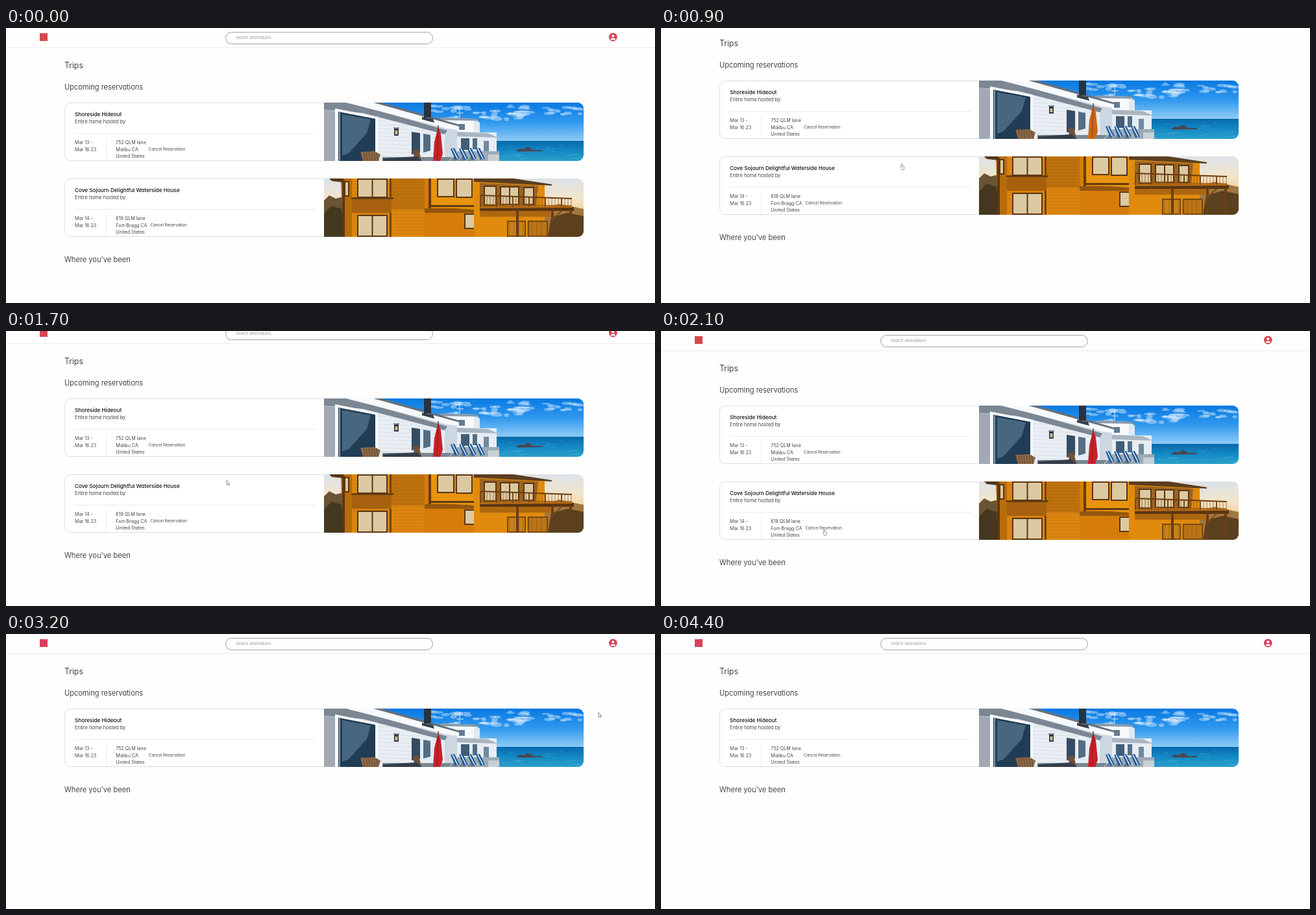
An HTML page with a canvas for the animation above (5000 ms loop, 1000 px wide and 424 px high).

```html
<!DOCTYPE html>
<html lang="en">
<head>
<meta charset="utf-8">
<title>Trips</title>
<style>
  html, body { margin: 0; width: 100%; height: 100%; overflow: hidden; background: #fefefe; }
  canvas, svg { position: absolute; left: 0; top: 0; width: 1000px; height: 424px; }
  svg { overflow: hidden; }
  text { font-family: Inter, "Open Sans", sans-serif; font-weight: 300; font-feature-settings: "cv11"; fill: #111; }
  .h1 { font-size: 12.6px; }
  .h2 { font-size: 11.2px; }
  .title { font-size: 8.2px; font-weight: 500; }
  .sub { font-size: 7.5px; }
  .info { font-size: 7.15px; }
  .small { font-size: 6.2px; }
  .hint { font-size: 5.95px; fill: #777; }
</style>
</head>
<body>
<canvas id="stage" width="1000" height="424"></canvas>
<svg viewBox="0 0 1000 424">
  <g id="page">
    <text class="hint" x="354" y="17.3">Search destinations</text>
    <text class="h1" x="90" y="62">Trips</text>
    <text class="h2" x="90" y="95">Upcoming reservations</text>
    <g id="cards"></g>
    <text class="h2" id="past" x="90">Where you've been</text>
  </g>
  <g id="pointer" fill="#fff" stroke="#666" stroke-width=".7" stroke-linejoin="round">
    <path id="arrow" d="M0 0V7.2L1.6 5.8L2.7 8.2L3.7 7.7L2.7 5.4H4.7Z"/>
    <path id="hand" d="M1.5 0Q2.4 0 2.4 1V3.6L5.4 4.3V6.6L4.6 9H1.8L-.6 5.6L.6 5V1Q.6 0 1.5 0Z"/>
  </g>
</svg>
<script>
const LOOP = 5000, REMOVED = 2700, CARD_Y = 115, CARD_GAP = 117;
const ctx = document.getElementById('stage').getContext('2d');
const el = id => document.getElementById(id);

// start time, scroll offset, pointer x, pointer y, pointer kind
const steps = [
  [0, 0, 0, 0, ''],
  [300, 0, 340, 340, 'arrow'],
  [500, 0, 349, 218, 'arrow'],
  [600, 7, 358, 215, 'arrow'],
  [700, 19, 366, 212, 'arrow'],
  [800, 28, 369, 210, 'arrow'],
  [900, 34, 369.5, 209.5, 'hand'],
  [1000, 39, 368, 209, 'arrow'],
  [1100, 39, 366, 209, 'arrow'],
  [1500, 34, 364, 210, 'arrow'],
  [1600, 22, 355, 217, 'arrow'],
  [1700, 11, 340, 230, 'arrow'],
  [1800, 4, 318, 250, 'arrow'],
  [1900, 0, 292, 274, 'arrow'],
  [2000, 0, 265, 297, 'arrow'],
  [2100, 0, 250, 306, 'hand'],
  [REMOVED, 0, 250, 306, 'arrow'],
  [3100, 0, 640, 205, 'arrow'],
  [3200, 0, 913, 121, 'arrow'],
  [3600, 0, 910, 200, 'arrow'],
  [3900, 0, 890, 300, 'arrow'],
  [4000, 0, 875, 394, 'arrow'],
  [4200, 0, 870, 406, 'arrow'],
  [4300, 0, 868, 418, 'arrow'],
  [4400, 0, 0, 0, '']
];

const trips = [
  { title: 'Shoreside Hideout', from: 'Mar 13 -', street: '752 QLM lane', city: 'Malibu CA', cancelX: 220, photo: beach },
  { title: 'Cove Sojourn Delightful Waterside House', from: 'Mar 14 -', street: '618 QLM lane', city: 'Fort-Bragg CA', cancelX: 222.5, photo: lodge }
];

function addText(parent, cls, x, y, value) {
  const node = document.createElementNS('http://www.w3.org/2000/svg', 'text');
  node.setAttribute('class', cls);
  node.setAttribute('x', x);
  node.setAttribute('y', y);
  node.textContent = value;
  parent.append(node);
}

trips.forEach((trip, i) => {
  const g = document.createElementNS('http://www.w3.org/2000/svg', 'g');
  g.setAttribute('transform', `translate(0 ${i * CARD_GAP})`);
  addText(g, 'title', 106, 136.2, trip.title);
  addText(g, 'sub', 106, 147.4, 'Entire home hosted by');
  addText(g, 'info', 106, 179.3, trip.from);
  addText(g, 'info', 106, 189.8, 'Mar 16 23');
  addText(g, 'info', 169.3, 179.3, trip.street);
  addText(g, 'info', 169.3, 189.8, trip.city);
  addText(g, 'info', 169.3, 200.2, 'United States');
  addText(g, 'small', trip.cancelX, 189.2, 'Cancel Reservation');
  el('cards').append(g);
});

function box(color, x, y, w, h) {
  ctx.fillStyle = color;
  ctx.fillRect(x, y, w, h);
}

function poly(color, ...pts) {
  ctx.fillStyle = color;
  ctx.beginPath();
  for (let i = 0; i < pts.length; i += 2) ctx.lineTo(pts[i], pts[i + 1]);
  ctx.fill();
}

function oval(color, x, y, rx, ry) {
  ctx.fillStyle = color;
  ctx.beginPath();
  ctx.ellipse(x, y, rx, ry, 0, 0, 7);
  ctx.fill();
}

function line(color, width, x1, y1, x2, y2) {
  ctx.strokeStyle = color;
  ctx.lineWidth = width;
  ctx.beginPath();
  ctx.moveTo(x1, y1);
  ctx.lineTo(x2, y2);
  ctx.stroke();
}

function fade(y1, y2, ...colors) {
  const g = ctx.createLinearGradient(0, y1, 0, y2);
  colors.forEach((c, i) => g.addColorStop(i / (colors.length - 1), c));
  return g;
}

function randomizer(seed) {
  return () => (seed = seed * 16807 % 2147483647) / 2147483647;
}

function pane(x, y, w, h, cols, frame = '#5b3512', glass = '#dcc9a2') {
  box(frame, x, y, w, h);
  const step = (w - 2) / cols;
  for (let i = 0; i < cols; i++) box(glass, x + 2 + i * step, y + 2, step - 2, h - 4);
}

function beach(umbrella) {
  box(fade(0, 60, '#0879e2', '#2f98ee', '#92cdf5'), 0, 0, 400, 60);
  const rnd = randomizer(71);
  for (let i = 0; i < 46; i++) {
    const x = 165 + rnd() * 150, y = 4 + rnd() * 24;
    oval('rgba(235,246,255,.42)', x, y, 3 + rnd() * 9, 1 + rnd() * 2.2);
  }
  for (let i = 0; i < 14; i++) {
    oval('rgba(235,246,255,.4)', 330 + rnd() * 70, 7 + rnd() * 12, 3 + rnd() * 7, 1 + rnd() * 1.8);
  }
  box(fade(59, 90, '#0868ad', '#1389c4', '#2a9fca'), 240, 59, 160, 31);
  for (let i = 0; i < 16; i++) box('rgba(130,210,235,.35)', 270 + rnd() * 120, 64 + rnd() * 24, 5 + rnd() * 12, .7);
  poly('#4b4650', 296, 74, 302, 71, 308, 72, 313, 68.5, 318, 70, 322, 73, 334, 73, 338, 75, 298, 75.5);

  // Far house
  poly('#dfe9f2', 176, 28, 182, 23, 232, 25, 240, 31, 240, 50, 176, 50);
  box('#f7fafc', 182, 27, 49, 18);
  poly('#8799a9', 176, 27, 180, 23, 236, 25, 238, 28);
  box('#637b90', 208, 33, 9, 9);
  line('#d9e7f0', 1, 209, 9, 209, 24);
  line('#d9e7f0', 1, 204, 16, 215, 16);
  box('#e7edf2', 188, 46, 78, 44);
  poly('#a9b6c2', 203, 45, 252, 47, 268, 54, 205, 52);
  box('#425d77', 211, 55, 13, 18);
  box('#526f89', 229, 55, 7, 17);
  box('#6e8ba3', 246, 59, 8, 18);
  box('#9caab5', 188, 75, 82, 15);

  // Near wall, eave and chimney
  poly('#cdd7e1', 0, 0, 80, 0, 205, 41, 205, 90, 0, 90);
  poly('#e8eef3', 0, 18, 60, 18, 186, 45, 186, 90, 0, 90);
  for (let y = 28; y < 90; y += 6) line('rgba(135,155,176,.25)', .6, 82, y, 185, y + 3);
  poly('#7c8794', 0, 0, 40, 0, 190, 43, 186, 49, 60, 16, 0, 11);
  poly('#f7fafc', 34, 0, 84, 0, 209, 36, 205, 42, 190, 40);
  poly('#65717d', 76, 0, 90, 0, 212, 35, 209, 37);
  box('#29333e', 154, 0, 11, 23);
  poly('#35404a', 151, 22, 168, 25, 170, 31, 151, 26);

  poly('#a1aab3', 0, 11, 20, 14, 20, 90, 0, 90);
  poly('#fafcfd', 17, 9, 83, 22, 83, 90, 17, 90);
  poly('#213c55', 22, 14, 79, 25, 79, 90, 22, 90);
  poly('#47677e', 28, 18, 72, 26, 66, 47, 38, 78, 28, 82);
  line('#829aae', 2, 24, 15, 24, 90);

  box('#303740', 108, 40, 7, 11);
  box('#d2b889', 109.5, 43, 4, 6);
  line('#303740', 1, 107, 39, 116, 39);
  poly('#344c62', 135, 45, 148, 47, 148, 77, 135, 80);
  poly('#536d83', 153, 48, 164, 50, 164, 74, 153, 77);
  box('#788792', 90, 84, 145, 6);

  poly(umbrella, 176, 37, 180, 49, 183, 79, 179, 90, 168, 90, 170, 61);
  line('rgba(75,20,15,.55)', 1, 176, 41, 174, 88);
  line('#713b28', 1.4, 176, 35, 176, 41);

  // Patio furniture
  poly('#8c6847', 56, 76, 78, 75, 87, 80, 84, 90, 60, 90);
  for (let x = 61; x < 84; x += 4) line('#5a432f', .8, x, 77, x + 2, 90);
  poly('#6f5038', 137, 74, 146, 72, 150, 90, 140, 90);
  poly('#343e48', 91, 86, 143, 83, 151, 90, 91, 90);
  for (let i = 0; i < 4; i++) {
    const x = 195 + i * 13;
    poly('#205a9a', x, 71, x + 6, 70, x + 14, 87, x + 7, 88);
    line('#e9f3fa', 1.5, x + 3, 71, x + 11, 87);
    line('#dce4e9', 1, x + 3, 84, x - 2, 90);
  }
  box('#c7d0d6', 253, 80, 17, 10);
}

function lodge() {
  box(fade(0, 60, '#dce2e9', '#f2e5cc', '#f1c986'), 0, 0, 400, 90);
  poly('#a17740', 338, 48, 362, 39, 400, 47, 400, 90, 338, 90);
  poly('#59401f', 350, 60, 375, 53, 400, 58, 400, 90, 345, 90);
  poly('#6a5433', 0, 34, 8, 26, 18, 31, 30, 28, 30, 90, 0, 90);
  poly('#453820', 0, 54, 12, 42, 30, 48, 30, 90, 0, 90);

  // Left wing
  poly('#b66b0c', 26, 0, 46, 0, 46, 90, 29, 90);
  box('#db850f', 43, 0, 122, 90);
  box('#bd710d', 104, 0, 51, 48);
  poly('#56371a', 8, 0, 30, 0, 30, 6, 12, 4);
  box('#5b3712', 28, 2, 4, 88);
  box('#734511', 101, 0, 3, 90);
  for (let y = 5; y < 90; y += 5) line('rgba(115,59,4,.22)', .6, 43, y, 240, y);
  box('#a7610e', 43, 31, 61, 22);
  box('#694013', 42, 29, 65, 3);
  pane(51, 0, 47, 30, 2);
  pane(51, 56, 47, 34, 2);
  pane(31, 4, 8, 24, 1);

  // Bay
  box('#d67c09', 155, 0, 85, 90);
  box('#95560d', 155, 46, 76, 7);
  poly('#e8930e', 164, 0, 231, 0, 235, 48, 166, 44);
  pane(174, 0, 27, 29, 1);
  pane(203, 0, 26, 30, 1);
  box('#603a13', 163, 41, 70, 3);
  box('#663c12', 161, 0, 4, 46);
  pane(216, 54, 18, 24, 1);

  // Right wing and deck
  poly('#e08b0d', 231, 2, 340, 9, 340, 90, 231, 90);
  poly('#5c3d20', 231, 0, 292, 0, 351, 9, 351, 11, 231, 5);
  poly('#9a6421', 240, 7, 330, 11, 327, 43, 240, 43);
  pane(246, 11, 20, 31, 1);
  pane(271, 12, 30, 29, 2);
  pane(307, 13, 17, 28, 1);
  box('#ae6710', 240, 49, 109, 10);
  pane(282, 65, 29, 25, 1, '#794810', '#c98219');
  pane(314, 65, 31, 25, 1, '#794810', '#bc7415');
  for (let x = 286; x < 342; x += 7) line('#925a16', .7, x, 67, x, 90);
  box('#5a3513', 240, 44, 145, 6);
  poly('#b96c12', 240, 43, 382, 42, 382, 45, 240, 46);
  line('#6b3b0c', 2, 241, 26, 382, 31);
  line('#a35c10', 1, 241, 40, 382, 42);
  for (let i = 0; i <= 28; i++) {
    const x = 241 + i * 5;
    line('#7a4812', i % 5 ? .6 : 2, x, 26 + i * .18, x, 44);
  }
  for (const x of [296, 350, 378]) box('#693e15', x, 49, 4, 41);
  line('#7d4a14', 2, 352, 63, 366, 50);
}

function drawCard(trip, y, umbrella) {
  ctx.save();
  ctx.beginPath();
  ctx.roundRect(90, y, 800, 90, 9);
  ctx.clip();
  box('#fff', 90, y, 400, 90);
  box('#ebebeb', 106, y + 47, 372, 1);
  box('#ebebeb', 154, y + 55, 1, 35);
  ctx.beginPath();
  ctx.rect(490, y, 400, 90);
  ctx.clip();
  ctx.translate(490, y);
  trip.photo(umbrella);
  ctx.restore();

  ctx.save();
  ctx.beginPath();
  ctx.rect(89, y - 1, 401, 92);
  ctx.clip();
  ctx.strokeStyle = '#dedede';
  ctx.lineWidth = 1;
  ctx.beginPath();
  ctx.roundRect(90.5, y + .5, 799, 89, 9);
  ctx.stroke();
  ctx.restore();
}

function drawHeader(accent) {
  box('#ececec', 0, 30, 1000, 1);
  box(accent, 52, 8, 12, 12);
  ctx.fillStyle = '#fff';
  ctx.strokeStyle = '#a2a2a2';
  ctx.lineWidth = 1;
  ctx.beginPath();
  ctx.roundRect(338.5, 6.5, 319, 18, 9);
  ctx.fill();
  ctx.stroke();

  oval(accent, 935.3, 14, 6.4, 6.4);
  oval('#fff', 935.3, 12.2, 2, 2);
  ctx.fillStyle = '#fff';
  ctx.beginPath();
  ctx.ellipse(935.3, 18.2, 3.8, 2.7, 0, Math.PI, 0);
  ctx.fill();
}

function draw(step) {
  const [time, scroll, x, y, kind] = step;
  const visible = time < REMOVED ? trips : trips.slice(0, 1);
  const umbrella = time >= 600 && time < 1100 ? '#cb6914' : '#c9202b';
  box('#fefefe', 0, 0, 1000, 424);
  ctx.save();
  ctx.translate(0, -scroll);
  drawHeader(time < REMOVED ? '#d8474f' : '#da405c');
  visible.forEach((trip, i) => drawCard(trip, CARD_Y + i * CARD_GAP, umbrella));
  ctx.restore();

  el('page').setAttribute('transform', `translate(0 ${-scroll})`);
  el('cards').lastChild.style.display = visible.length > 1 ? '' : 'none';
  el('past').setAttribute('y', 127.3 + visible.length * CARD_GAP);
  el('pointer').setAttribute('transform', `translate(${x} ${y})`);
  for (const id of ['arrow', 'hand']) el(id).style.display = id === kind ? '' : 'none';
}

let shown;
function tick() {
  const t = performance.now() % LOOP;
  const step = steps.findLast(s => s[0] <= t);
  if (step !== shown) draw(shown = step);
  requestAnimationFrame(tick);
}
tick();
</script>
</body>
</html>
```
